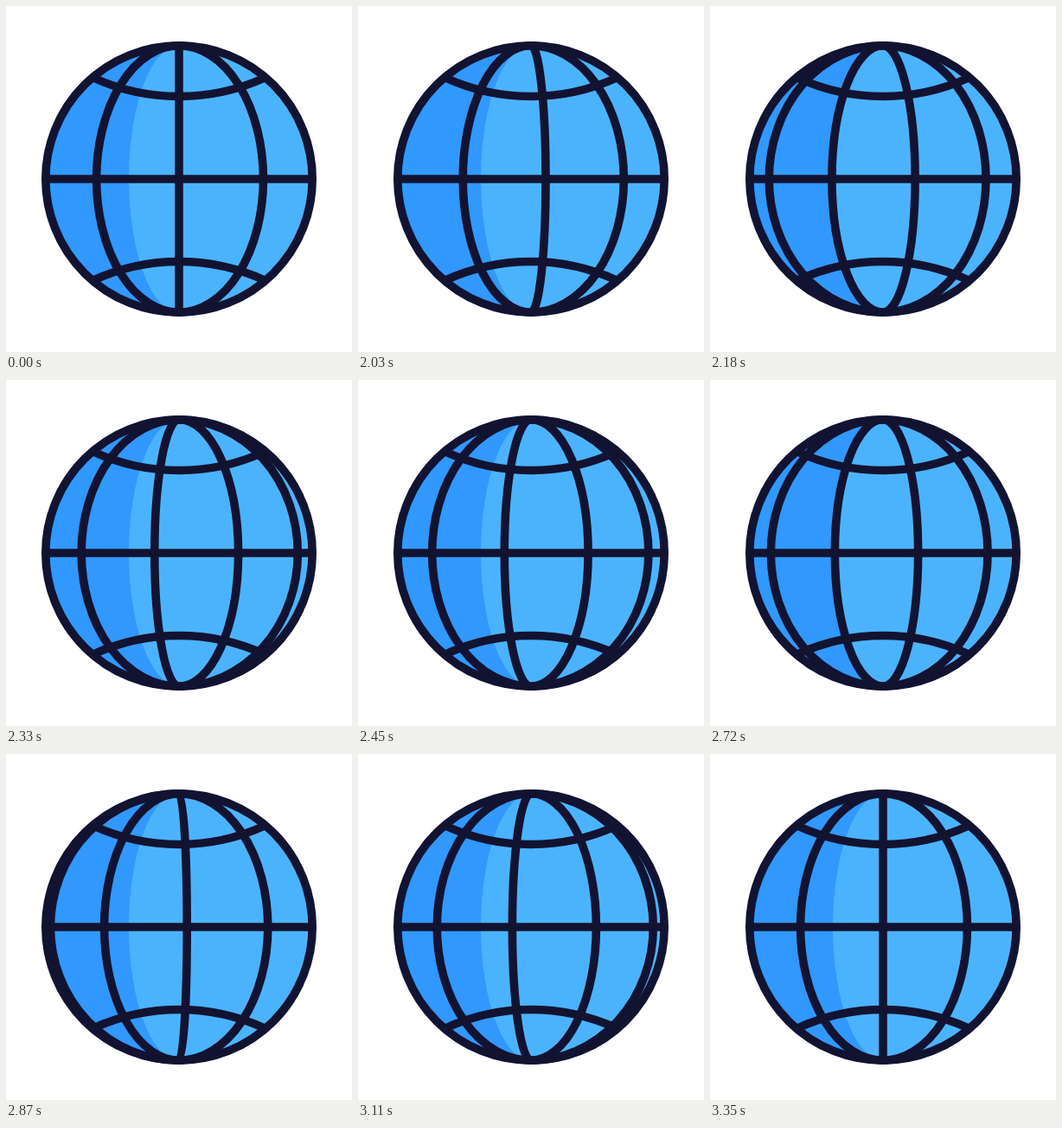
Recreate the animation shown at these times as an HTML page. Size 400x400 px, loop 3.44 s.

```html
<!DOCTYPE html>
<html lang="en">
<head>
<meta charset="utf-8">
<title>Spinning globe</title>
<style>
  html, body { margin: 0; width: 100%; height: 100%; overflow: hidden; background: #fff; }
  svg { display: block; width: 100vw; height: 100vh; }
  .lines { fill: none; stroke: #121331; stroke-width: 9.6; stroke-linejoin: round; }
</style>
</head>
<body>
<svg viewBox="0 0 400 400">
  <circle cx="200" cy="200" r="154.2" fill="#4bb3fd"/>
  <path d="M200 45.8A154.2 154.2 0 0 0 200 354.2A58 154.2 0 0 1 200 45.8Z" fill="#3098ff"/>
  <g class="lines">
    <path d="M46 200H354"/>
    <path d="M101 83A238.7 238.7 0 0 0 299 83"/>
    <path d="M101 317A238.7 238.7 0 0 1 299 317"/>
    <g id="meridians"></g>
    <circle cx="200" cy="200" r="154.2"/>
  </g>
</svg>
<script>
  const LOOP = 3440, START = 2000, SPIN = 1360, TURNS = 7;
  const FIRST = 2030, LAST = 3350, STEP = 30;
  const STOPS = [-154.2, -95.5, 0, 97.5, 154.2];
  const R = 154.2;

  const group = document.getElementById('meridians');
  const lines = STOPS.slice(1).map(() =>
    group.appendChild(document.createElementNS('http://www.w3.org/2000/svg', 'path')));

  const bezier = (a, b, s) => 3 * (1 - s) ** 2 * s * a + 3 * (1 - s) * s * s * b + s ** 3;

  function ease(u) {
    let lo = 0, hi = 1;
    for (let i = 0; i < 30; i++) {
      const mid = (lo + hi) / 2;
      if (bezier(0.167, 0.45, mid) < u) lo = mid; else hi = mid;
    }
    return bezier(0.167, 1, lo);
  }

  function turnsAt(t) {
    if (t < FIRST || t >= LAST) return 0;
    const held = FIRST + Math.floor((t - FIRST) / STEP) * STEP;
    return TURNS * ease((held - START) / SPIN);
  }

  // Half ellipse from pole to pole, bulging x to the right of the axis.
  function meridian(x) {
    if (Math.abs(x) < 0.05) return `M200 ${200 - R}V${200 + R}`;
    return `M200 ${200 - R}A${Math.abs(x)} ${R} 0 0 ${x > 0 ? 1 : 0} 200 ${200 + R}`;
  }

  function draw(t) {
    const turns = turnsAt(t), p = turns % 1;
    lines.forEach((line, i) =>
      line.setAttribute('d', meridian(STOPS[i] + (STOPS[i + 1] - STOPS[i]) * p)));
    // The entering line joins just after the spin begins.
    lines[0].style.display = turns < 0.2 ? 'none' : '';
  }

  const t0 = performance.now();
  function frame() {
    draw((performance.now() - t0) % LOOP);
    requestAnimationFrame(frame);
  }
  draw(0);
  requestAnimationFrame(frame);
</script>
</body>
</html>
```
